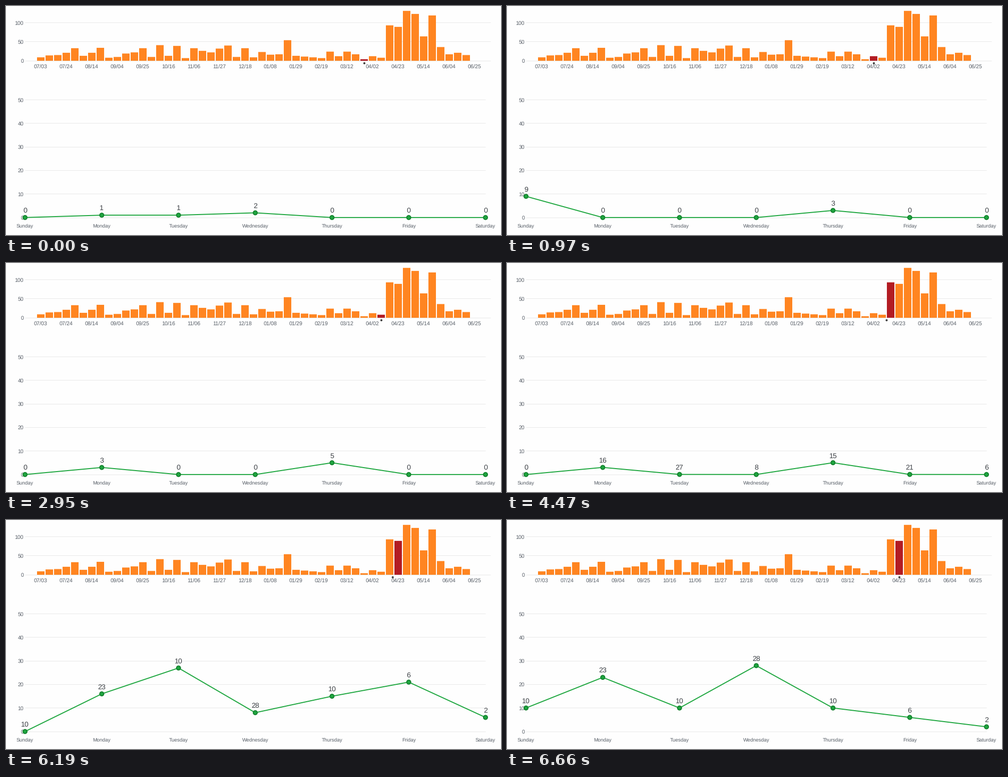
Recreate the animation shown at these times as a matplotlib script. Size 989 by 460 pixels, loop 8 s.

```python
import math

import matplotlib.pyplot as plt
from matplotlib.animation import FuncAnimation
from matplotlib.patches import Circle

# A power-of-two dpi keeps the pixel size exact
W, H, DPI = 989, 460, 64
LOOP, STEP = 8000, 20

ORANGE, RED = "#ff8521", "#b31c23"
GREEN, DARK_GREEN = "#1fa740", "#15832f"
GRID, TICK, VALUE, DOT = "#e8e8e8", "#565d66", "#3c4045", "#444444"

WEEKS = [9, 14, 15, 21, 33, 13, 21, 34, 8, 10, 19, 22, 33, 10, 41, 13, 39,
         7, 33, 26, 22, 32, 40, 10, 33, 9, 23, 16, 17, 54, 13, 11, 9, 7,
         24, 12, 24, 17, 4, 12, 8, 93, 89, 131, 123, 64, 119, 36, 17, 21, 15]
DATES = ("07/03 07/24 08/14 09/04 09/25 10/16 11/06 11/27 12/18 "
         "01/08 01/29 02/19 03/12 04/02 04/23 05/14 06/04 06/25").split()
DAYS = "Sunday Monday Tuesday Wednesday Thursday Friday Saturday".split()

# Commits per weekday for the selected weeks, starting at FIRST
FIRST = 38
COUNTS = [[0, 1, 1, 2, 0, 0, 0],
          [9, 0, 0, 0, 3, 0, 0],
          [0, 3, 0, 0, 5, 0, 0],
          [0, 16, 27, 8, 15, 21, 6],
          [10, 23, 10, 28, 10, 6, 2]]
# (start, end, time already elapsed at start) of each change, in ms
CHANGES = [(500, 970, 35), (2500, 2950, 35), (4470, 4930, 38), (6190, 6660, 24)]

BAR_X, PITCH, BAR_W = 62, 17, 15
BAR_BASE, BAR_UNIT = 110, 0.765
LINE_BASE, LINE_UNIT = 424.9, 4.728
DAY_X = [38 + 920 * i / 6 for i in range(7)]


def px(n):
    return n * 72 / DPI


def cubic_in_out(p):
    p = min(max(p, 0), 1)
    return 4 * p ** 3 if p < 0.5 else 1 - 4 * (1 - p) ** 3


def back_out(p, s=1.70158):
    u = 1 - min(max(p, 0), 1)
    return 1 - u * u * ((s + 1) * u - s)


def day_y(value):
    return LINE_BASE - LINE_UNIT * value


plt.rcParams["font.family"] = "Liberation Sans"
plt.rcParams["text.hinting"] = "none"
fig = plt.figure(figsize=(W / DPI, H / DPI), dpi=DPI, facecolor="#fefefe")
ax = fig.add_axes([0, 0, 1, 1])
ax.axis("off")


def label(x, y, text, size=10.5, color=TICK, ha="center", z=2):
    return ax.text(x, y, text, fontsize=px(size), color=color, ha=ha,
                   va="baseline", zorder=z)


def grid(values, base, unit, right):
    ys = [base - unit * v for v in values]
    ax.hlines([y - 0.3 for y in ys], 38, right, color=GRID, lw=px(1), zorder=0)
    for v, y in zip(values, ys):
        label(35, y + 4, str(v), ha="right")


# Weekly bars
grid((0, 50, 100), BAR_BASE, BAR_UNIT, 968)
bars = ax.bar([BAR_X + PITCH * i for i in range(len(WEEKS))],
              [-BAR_UNIT * n for n in WEEKS], width=BAR_W, bottom=BAR_BASE,
              align="edge", color=ORANGE, lw=0, snap=False, zorder=1)
for i, date in enumerate(DATES):
    label(69.5 + 3 * PITCH * i, 126, date, 10.7)
pointer = ax.add_patch(Circle((0, 115), 2.1, fc=DOT, lw=0, zorder=5))

# Commits per weekday
grid(range(0, 60, 10), LINE_BASE, LINE_UNIT, 958)
for x, day in zip(DAY_X, DAYS):
    label(x, 445, day, 10)
line, = ax.plot(DAY_X, [LINE_BASE] * 7, color=GREEN, lw=px(2), snap=False,
                zorder=3)
points = [ax.add_patch(Circle((x, LINE_BASE), 4, fc=GREEN, ec=DARK_GREEN,
                              lw=px(2), zorder=4)) for x in DAY_X]
numbers = [label(x, 0, "", 14.3, VALUE, z=5) for x in DAY_X]

ax.set_xlim(0, W)
ax.set_ylim(H, 0)


def progress(t):
    """Selected week, line progress and pointer progress at time t."""
    week, elapsed = 0, math.inf
    for i, (start, end, lag) in enumerate(CHANGES):
        if t >= start:
            tick = (end - start) / 5
            shown = math.floor((t - start) / tick + 1e-6)
            week = i + 1
            elapsed = math.inf if shown >= 5 else lag + shown * tick
    return week, cubic_in_out(elapsed / 500), back_out(elapsed / 300)


def draw(frame):
    week, k, p = progress(frame * STEP + STEP / 2)
    old = max(week - 1, 0)
    for i in range(len(COUNTS)):
        bars[FIRST + i].set_facecolor(RED if i == week else ORANGE)
    pointer.center = 70 + PITCH * (FIRST + old + (week - old) * p), 115

    ys = [day_y(a + (b - a) * k) for a, b in zip(COUNTS[old], COUNTS[week])]
    line.set_ydata(ys)
    for x, y, n, point, number in zip(DAY_X, ys, COUNTS[week], points, numbers):
        point.center = x, y
        number.set_y(y - 9.8)
        number.set_text(str(n))
    return [*bars, pointer, line, *points, *numbers]


anim = FuncAnimation(fig, draw, frames=LOOP // STEP, interval=STEP,
                     repeat=True, repeat_delay=0, blit=False)
plt.show()
```
